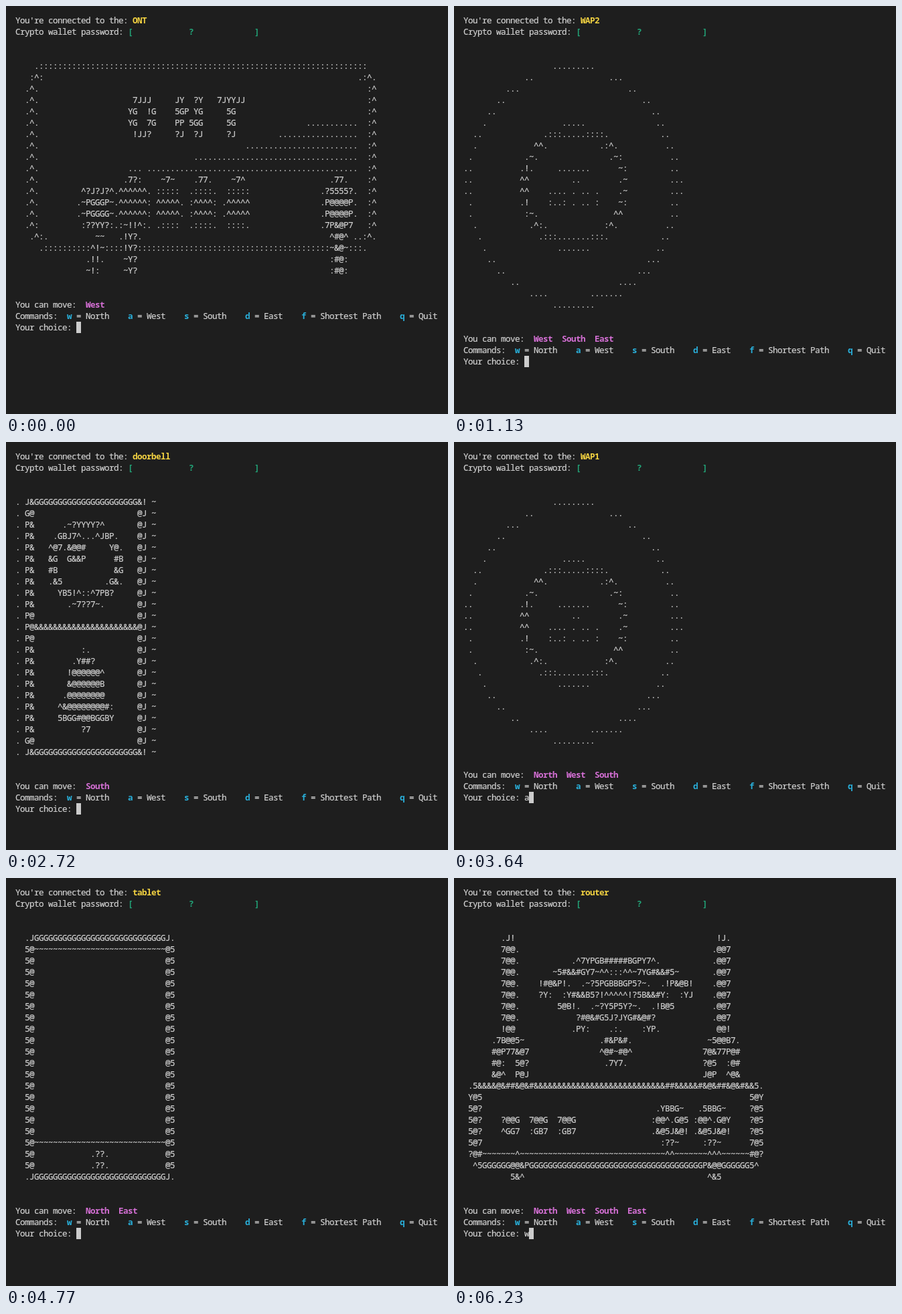
An HTML page that plays this animation: 660 by 610 pixels, repeating every 6290 ms.

```html
<!DOCTYPE html>
<html lang="en">
<head>
<meta charset="utf-8">
<title>Network walk</title>
<style>
  html, body { margin: 0; width: 100%; height: 100%; overflow: hidden; background: #1e1e1e; }
  /* Terminal grid: glyphs slightly wider than their 7px cells. */
  pre {
    position: absolute; left: 14px; top: 13px; margin: 0; visibility: hidden;
    font: 12.6px/17px "Noto Sans Mono", "DejaVu Sans Mono", monospace;
    letter-spacing: calc(7px - 1ch);
    font-variant-ligatures: none; color: #d2d2d2;
    -webkit-text-stroke: 0.2px;
  }
  pre.on { visibility: visible; }
  b { font-weight: 700; -webkit-text-stroke: 0; }
  .name { color: #f5d442; }
  .pass { color: #22a478; }
  .move { color: #d670d6; }
  .cmd { color: #29b0db; }
  .key { display: none; }
  .typed .key { display: inline; }
  .cursor { display: inline-block; width: 7px; height: 17px; vertical-align: top; background: #ccc; }
</style>
</head>
<body>
<script>
// In the drawings {12x} stands for a run of twelve x.
const art = {
ont: `
    .{70:}
   :^:{67 }.:^.
  .^.{70 }:^
  .^.{20 }7JJJ     JY  ?Y   7JYYJJ{26 }:^
  .^.{19 }YG  !G    5GP YG     5G{28 }:^
  .^.{19 }YG  7G    PP 5GG     5G{15 }{11.}  :^
  .^.{20 }!JJ?     ?J  ?J     ?J{9 }{17.}  :^
  .^.{44 }{24.}  :^
  .^.{33 }{35.}  :^
  .^.{19 }... {45.}  :^
  .^.{18 }.7?:    ~7~    .77.    ~7^{18 }.77.    :^
  .^.{9 }^?J?J?^.{6^}. :::::  .::::.  :::::{15 }.?5555?.  :^
  .^.{8 }.~PGGGP~.{6^}: ^^^^^. :^^^^: .^^^^^{15 }.P@@@@P.  :^
  .^.{8 }.~PGGGG~.{6^}: ^^^^^. :^^^^: .^^^^^{15 }.P@@@@P.  :^
  .^:{9 }:??YY?:.:~!!^:. .::::  .::::.  ::::.{15 }.7P&@P7   :^
   .^:.{10 }~~   .!Y?.{40 }^#@^ ..:^.
     .{10:}^!~::::!Y?{41:}~&@~:::.
{15 }.!!.    ~Y?{41 }:#@:
{15 }~!:     ~Y?{41 }:#@:`,

router: `
{8 }.J!{43 }!J.
{8 }7@@.{41 }.@@7
{8 }7@@.{11 }.^7YPGB#####BGPY7^.{11 }.@@7
{8 }7@@.       ~5#&&#GY7~^^:::^^~7YG#&&#5~       .@@7
{8 }7@@.    !#@&P!.  .~?5PGBBBGP5?~.  .!P&@B!    .@@7
{8 }7@@.    ?Y:  :Y#&&B5?!^^^^^!?5B&&#Y:  :YJ    .@@7
{8 }7@@.{8 }5@B!.  .~?Y5P5Y?~.  .!B@5{8 }.@@7
{8 }7@@.{12 }?#@&#G5J?JYG#&@#?{12 }.@@7
{8 }!@@{12 }.PY:    .:.    :YP.{12 }@@!
      .7B@@5~{16 }.#&P&#.{16 }~5@@B7.
      #@P77&@7{15 }^@#~#@^{15 }7@&77P@#
      #@:  5@?{16 }.7Y7.{16 }?@5  :@#
      &@^  P@J{37 }J@P  ^@&
 .5&&&&@&##&@&#{28&}##&&&&&#&@&##&@&#&&5.
 Y@5{57 }5@Y
 5@?{37 }.YBBG~   .5BBG~     ?@5
 5@?    ?@@G  7@@G  7@@G{16 }:@@^.G@5 :@@^.G@Y    ?@5
 5@?    ^GG7  :GB7  :GB7{16 }.&@5J&@! .&@5J&@!    ?@5
 5@7{38 }:??~     :??~      7@5
 ?@#{7~}^{31~}^^{7~}^^^{6~}#@?
  ^5GGGGGG@@&P{37G}P&@@GGGGGG5^
{10 }5&^{39 }^&5`,

doorbell: `
. J&{22G}&! ~
. G@{22 }@J ~
. P&      .~?YYYY?^       @J ~
. P&    .GBJ7^...^JBP.    @J ~
. P&   ^@7.&@@#     Y@.   @J ~
. P&   &G  G&&P      #B   @J ~
. P&   #B{12 }&G   @J ~
. P&   .&5{9 }.G&.   @J ~
. P&     YB5!^::^7PB?     @J ~
. P&       .~7??7~.       @J ~
. P@{22 }@J ~
. P@{22&}@J ~
. P@{22 }@J ~
. P&{10 }:.{10 }@J ~
. P&{8 }.Y##?{9 }@J ~
. P&       !@@@@@@^       @J ~
. P&       &@@@@@@B       @J ~
. P&      .@@@@@@@@       @J ~
. P&     ^&@@@@@@@@#:     @J ~
. P&     5BGG#@@BGGBY     @J ~
. P&{10 }?7{10 }@J ~
. G@{22 }@J ~
. J&{22G}&! ~`,

tv: `
{12 }Y@&~
{12 }:G@@&!{14 }J&#.
{14 }.P@@&7{9 }.Y@@@J
{16 }.5@@@?     .5@@&7
{18 }.J@@@J..P@@&!
{21 }5@@@@@@?
 :G{44@}G^
?@@@5~^::{20^}:::{13^}5@@@J
&@@G   :5{21P}!{15 }P@@@
&@@P  ?@!{20 }:&B     ~?J?:    5@@@
&@@G  &G{22 }~@:  !@B?!J&&:  P@@@
&@@G  @5{22 }^@^  @B     @#  P@@@
&@@G  @5{22 }^@^  P@?..:P@!  P@@@
&@@G  @5{22 }^@^   ^5GGGJ.   P@@@
&@@G  @5{22 }^@^     :^.     P@@@
&@@G  @5{22 }^@^  :B&G5G&5   P@@@
&@@G  @5{22 }:@^  @&    .@G  P@@@
&@@G  B&{22 }5@.  &@:   !@5  P@@@
&@@P   B#?~{17^}!G&^    J#BB#B!   5@@@
&@@#    .~{18?}!:{16 }B@@&
:&@@&P55{22Y}55555555555555P&@@&^
  !G&{40@}&B7`,

wap: `
{19 }.........
{13 }..{16 }...
{9 }...{23 }..
{7 }..{29 }..
     ..{33 }..
    .{16 }.....{15 }..
  ..{13 }.:::.....::::.{11 }..
  .{12 }^^.{11 }.:^.{10 }..
 .{11 }.~.{15 }.~:{10 }..
..{10 }.!.     .......      ~:{9 }..
..{10 }^^{9 }..{8 }.~{9 }...
..{10 }^^    .... . .. .    .~{9 }...
 .{10 }.!    :..: . .. :    ~:{9 }..
 .{11 }:~.{16 }^^{10 }..
  .{11 }.^:.{12 }:^.{10 }..
   .{12 }.:::.......:::.{11 }..
    .{15 }.......{14 }..
     ..{32 }...
       ..{28 }...
{10 }..{21 }....
{14 }....{9 }.......
{19 }.........`,

computer: `
  ^5{43G}5^
  #@?{41~}?@#
${"  #@^{41 }^@#\n".repeat(14)}  #@?{41~}?@#
  ^5{43G}5^
{22 }7@@@@@7
{22 }P@@@@@P
{18 }:?5{9@}5?:
{16 }.{17:}.`,

tablet: `
  .J{28G}J.
  5@{28~}@5
${"  5@{28 }@5\n".repeat(16)}  5@{28~}@5
  5@{12 }.??.{12 }@5
  5@{12 }.??.{12 }@5
  .J{28G}J.`
};

// start, time of the key press, key, device, drawing, exits
const scenes = [
  [0, 540, "a", "ONT", "ont", "West"],
  [610, 1000, "a", "router", "router", "North  West  South  East"],
  [1130, 1590, "d", "WAP2", "wap", "West  South  East"],
  [1660, 2130, "w", "router", "router", "North  West  South  East"],
  [2190, 2650, "w", "WAP1", "wap", "North  West  South"],
  [2720, 3180, "s", "doorbell", "doorbell", "South"],
  [3250, 3640, "a", "WAP1", "wap", "North  West  South"],
  [3710, 4170, "a", "computer", "computer", "West  East"],
  [4240, 4700, "s", "TV", "tv", "South  East"],
  [4770, 5230, "d", "tablet", "tablet", "North  East"],
  [5300, 5770, "d", "WAP2", "wap", "West  South  East"],
  [5830, 6230, "w", "router", "router", "North  West  South  East"]
];
const LOOP = 6290;
const commands = ["w = North", "a = West", "s = South", "d = East", "f = Shortest Path", "q = Quit"];

const expand = s => s.replace(/\{(\d+)(.)\}/g, (_, n, c) => c.repeat(n));

function tag(kind, text, cls) {
  const el = document.createElement(kind);
  el.className = cls;
  el.textContent = text;
  return el;
}

function build([, , key, name, drawing, exits]) {
  const pre = document.createElement("pre");
  pre.append(
    "You're connected to the: ", tag("b", name, "name"),
    "\nCrypto wallet password: ", tag("b", expand("[{12 }?{13 }]"), "pass"),
    "\n\n" + expand(art[drawing]) + "\n\n\nYou can move:  ", tag("b", exits, "move"),
    "\nCommands:  "
  );
  commands.forEach((c, i) => pre.append(i ? "    " : "", tag("b", c[0], "cmd"), c.slice(1)));
  pre.append("\nYour choice: ", tag("span", key, "key"), tag("span", "", "cursor"));
  document.body.append(pre);
  return pre;
}

const views = scenes.map(build);

function draw() {
  const t = performance.now() % LOOP;
  const now = scenes.findLastIndex(s => t >= s[0]);
  views.forEach((v, i) => {
    v.classList.toggle("on", i === now);
    v.classList.toggle("typed", t >= scenes[i][1]);
  });
  requestAnimationFrame(draw);
}
draw();
</script>
</body>
</html>
```
